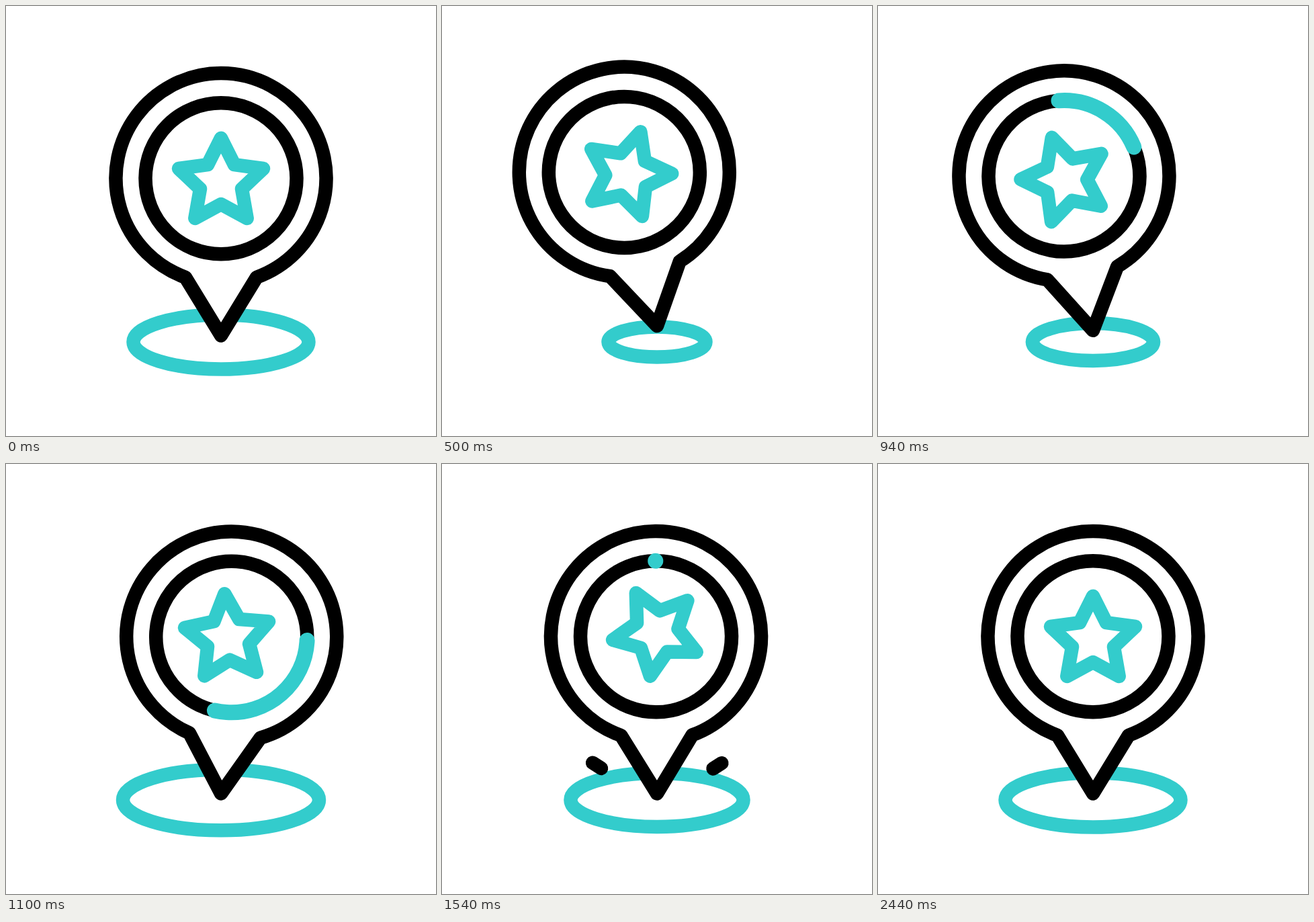
These frames come from a looping animation (640x640 px, 3600 ms). An HTML page without scripts:

```html
<!DOCTYPE html>
<html lang="en">
<head>
<meta charset="utf-8">
<title>Star pin</title>
<style>
  @property --head { syntax: "<length>"; inherits: true; initial-value: 0px; }
  @property --tail { syntax: "<length>"; inherits: true; initial-value: 0px; }

  :root {
    --loop: 3600ms infinite;
    --smooth: cubic-bezier(.333, 0, .667, 1);
  }
  html, body { margin: 0; width: 100%; height: 100%; overflow: hidden; background: #fff; }
  svg { display: block; width: 100%; height: 100%; }

  .line {
    fill: none;
    stroke: #000;
    stroke-width: 20.5;
    stroke-linecap: round;
    stroke-linejoin: round;
  }
  .teal { stroke: #33cccc; }
  .body { fill: #fff; }

  .ground { rx: 130.5px; ry: 40.5px; animation: ground var(--loop) var(--smooth); }
  .pin {
    transform-origin: 320px 490.5px;
    animation: sway var(--loop) var(--smooth), hop var(--loop) var(--smooth);
  }
  .star { transform-origin: 320px 256.5px; animation: spin var(--loop); }

  /* A stroke visible only between --tail and --head */
  .trim {
    stroke-dasharray: calc(var(--head) - var(--tail)) 720px;
    stroke-dashoffset: calc(-1 * var(--tail));
    visibility: hidden;
  }
  .arc {
    stroke-width: 23;
    animation: arc-head var(--loop) var(--smooth), arc-tail var(--loop) var(--smooth),
      arc-show var(--loop) step-end;
  }
  .spark {
    animation: spark-head var(--loop) var(--smooth), spark-tail var(--loop) var(--smooth),
      spark-show var(--loop) step-end;
  }

  @keyframes ground {
    0%, 2.08% { rx: 130.5px; ry: 40.5px; }
    22.22% { rx: 38.5px; ry: 12px; }
    30.28% { rx: 146.2px; ry: 45.4px; }
    37.22% { rx: 111px; ry: 34.5px; }
    44.17%, to { rx: 130.5px; ry: 40.5px; }
  }
  @keyframes sway {
    0% { rotate: 0deg; }
    23.33% { rotate: -18.7deg; }
    30.28% { rotate: 3.9deg; }
    37.22% { rotate: -3.6deg; }
    44.17%, to { rotate: 0deg; }
  }
  @keyframes hop {
    0% { translate: 0 0; animation-timing-function: cubic-bezier(.92, 0, .47, 1); }
    23.15% { translate: 0 -40px; animation-timing-function: cubic-bezier(.33, 0, .5, 1); }
    27.78%, to { translate: 0 0; }
  }
  @keyframes spin {
    0% { rotate: 0deg; animation-timing-function: cubic-bezier(.36, 0, .508, 1); }
    16.75% { rotate: -45deg; animation-timing-function: cubic-bezier(.577, 0, .145, 1); }
    67.78%, to { rotate: 720deg; }
  }
  @keyframes arc-head {
    0%, 19.97% { --head: 0px; }
    40.5%, to { --head: 360px; }
  }
  @keyframes arc-tail {
    0%, 24.67% { --tail: 0px; }
    42.94%, to { --tail: 360px; }
  }
  @keyframes arc-show {
    0% { visibility: hidden; }
    20% { visibility: visible; }
    42.9%, to { visibility: hidden; }
  }
  @keyframes spark-head {
    0%, 31.25% { --head: 0px; }
    43.75%, to { --head: 59px; }
  }
  @keyframes spark-tail {
    0%, 35.8% { --tail: 0px; }
    46.5%, to { --tail: 59px; }
  }
  @keyframes spark-show {
    0% { visibility: hidden; }
    31.4% { visibility: visible; }
    46.4%, to { visibility: hidden; }
  }
</style>
</head>
<body>
<svg viewBox="0 0 640 640">
  <ellipse class="line teal ground" cx="320" cy="500"/>
  <path class="line trim spark" d="M273 476l-50-32"/>
  <path class="line trim spark" d="M367.5 476.5l50-32"/>
  <g class="pin">
    <path class="line body" d="M267 403.8A156.5 156.5 0 1 1 373 403.8L320 490.5Z"/>
    <circle class="line" cx="320" cy="256.8" r="112.5"/>
    <path class="line teal trim arc" pathLength="360"
      d="M320 144.3a112.5 112.5 0 0 1 0 225a112.5 112.5 0 0 1 0-225"/>
    <polygon class="line teal star"
      points="320,196.7 339.8,236.2 383,242 351,272.2 358.7,316 320,295.1 281.3,316 289,272.2 257,242 300.2,236.2"/>
  </g>
</svg>
</body>
</html>
```
